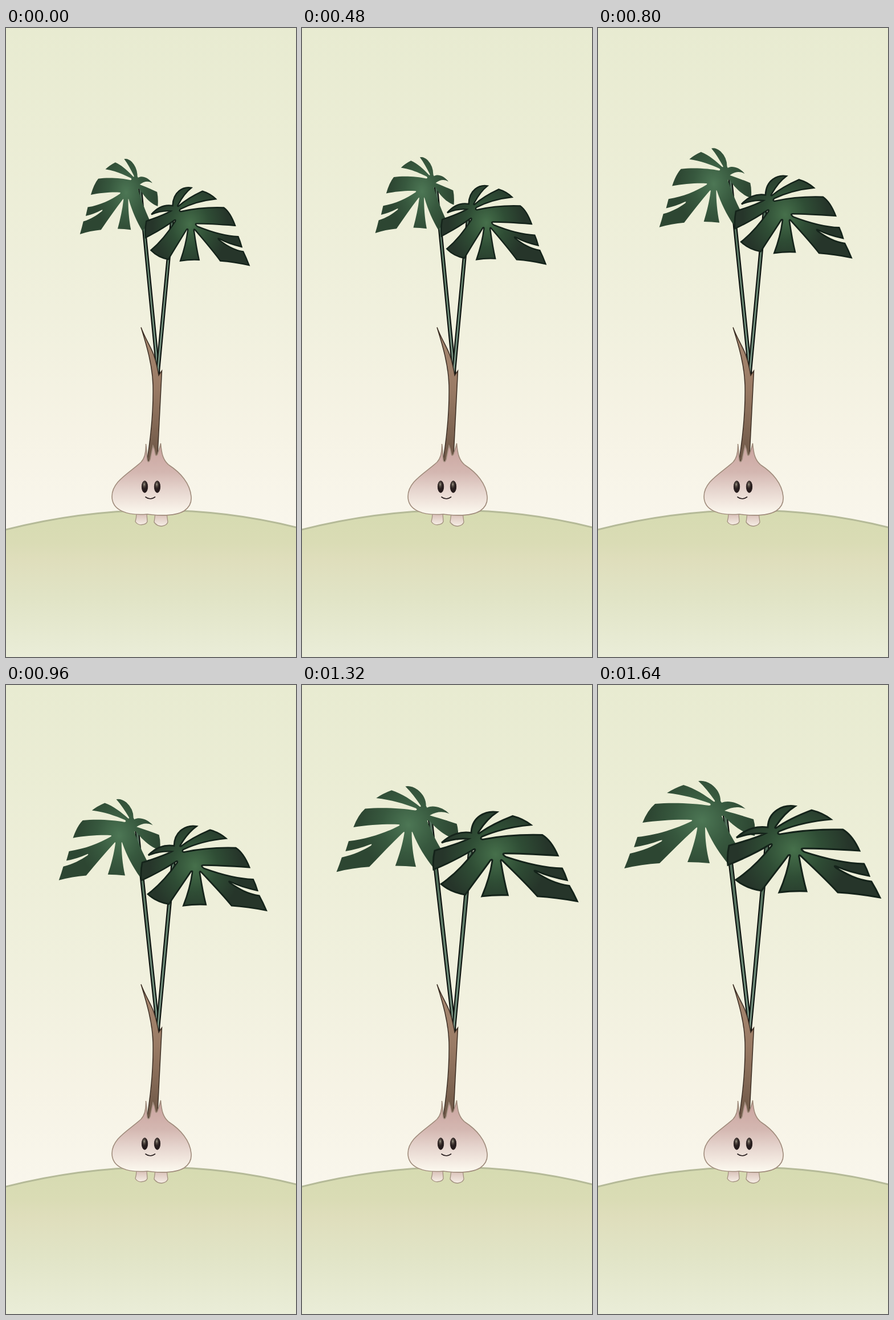
Write an HTML page that moves like this. It is 509 px wide and 1101 px high and loops after 2.04 s.

```html
<!DOCTYPE html>
<html lang="en">
<head>
<meta charset="utf-8">
<title>Growing plant</title>
<style>
html, body { margin: 0; width: 100%; height: 100%; overflow: hidden; background: #f0f0de; }
svg { display: block; width: 100%; height: 100%; }
</style>
</head>
<body>
<svg viewBox="0 0 509 1101">
  <defs>
    <linearGradient id="sky" gradientUnits="userSpaceOnUse" x1="0" y1="0" x2="0" y2="880">
      <stop offset="0" stop-color="#e8ebd1"/>
      <stop offset=".22" stop-color="#ebedd5"/>
      <stop offset=".56" stop-color="#f0f0dd"/>
      <stop offset=".8" stop-color="#f6f3e5"/>
      <stop offset="1" stop-color="#f9f6ec"/>
    </linearGradient>
    <linearGradient id="hill" gradientUnits="userSpaceOnUse" x1="0" y1="844" x2="0" y2="1101">
      <stop offset="0" stop-color="#d6dbb1"/>
      <stop offset=".22" stop-color="#dadcb5"/>
      <stop offset=".34" stop-color="#dfdebc"/>
      <stop offset=".6" stop-color="#e1e4c6"/>
      <stop offset="1" stop-color="#eaedd8"/>
    </linearGradient>
    <linearGradient id="stalk" gradientUnits="userSpaceOnUse" x1="0" y1="524" x2="0" y2="760">
      <stop offset="0" stop-color="#a88a72"/>
      <stop offset=".45" stop-color="#9a7b65"/>
      <stop offset="1" stop-color="#6b5545"/>
    </linearGradient>
    <linearGradient id="bulb" gradientUnits="userSpaceOnUse" x1="0" y1="727" x2="0" y2="853">
      <stop offset="0" stop-color="#c9a29d"/>
      <stop offset=".4" stop-color="#d4b7b1"/>
      <stop offset=".65" stop-color="#e6d5ce"/>
      <stop offset="1" stop-color="#fdfaf0"/>
    </linearGradient>
    <linearGradient id="foot" x1="0" y1="0" x2="0" y2="1">
      <stop offset="0" stop-color="#d6bcb4"/>
      <stop offset="1" stop-color="#f6eee5"/>
    </linearGradient>
    <radialGradient id="eye" cx=".42" cy=".3" r=".5">
      <stop offset="0" stop-color="#a5a392"/>
      <stop offset=".3" stop-color="#5a5048"/>
      <stop offset=".7" stop-color="#2d2322"/>
      <stop offset="1" stop-color="#261c1d"/>
    </radialGradient>
    <linearGradient id="stem" gradientUnits="userSpaceOnUse" x1="0" y1="330" x2="0" y2="600">
      <stop offset="0" stop-color="#536f5c"/>
      <stop offset=".5" stop-color="#678471"/>
      <stop offset="1" stop-color="#759080"/>
    </linearGradient>
    <radialGradient id="back" gradientUnits="userSpaceOnUse" cx="182" cy="237" r="92">
      <stop offset="0" stop-color="#4d7755"/>
      <stop offset=".55" stop-color="#37583e"/>
      <stop offset="1" stop-color="#2d4632"/>
    </radialGradient>
    <radialGradient id="front" gradientUnits="userSpaceOnUse" cx="343" cy="288" r="98">
      <stop offset="0" stop-color="#46704b"/>
      <stop offset=".5" stop-color="#2f4d35"/>
      <stop offset="1" stop-color="#26352a"/>
    </radialGradient>
  </defs>

  <rect width="509" height="1101" fill="url(#sky)"/>
  <path d="M-6 879.500Q262 811 515 875.500V1110H-6Z" fill="url(#hill)" stroke="#b5ba98" stroke-width="3"/>

  <g stroke="#070c09" stroke-width="2" fill="url(#stem)">
    <path id="stemL"/>
    <path id="stemR"/>
  </g>

  <path id="leafL" fill="url(#back)" d="M176 168Q187 166 199 174Q215 186 215 203L217 206C228 201 246 205 259 217C247 212 235 213 222 220C240 225 258 230 273 235Q277 248 275 264C256 260 236 246 221 229L217 229Q227 256 252 294L230 315C214 296 200 275 190 251Q188 247 188 251C188 268 190 290 196 312Q176 310 157 310C165 290 171 270 174 252Q175 247 171 251C150 270 130 290 108 312Q76 314 46 321Q52 307 56 295C79 290 95 283 111 274Q115 270 109 272Q88 280 63 284L69 266C105 262 138 251 163 239Q168 236 162 236C140 235 105 237 78 241Q87 219 100 208C130 205 170 207 195 211Q200 210 196 207C173 199 150 192 121 189Q133 181 150 175C170 181 188 193 203 204Q207 205 204 201C196 190 187 178 176 168Z"/>

  <path id="leafR" fill="url(#front)" stroke="#14231a" vector-effect="non-scaling-stroke" d="M346 212C325 209 299 220 298 249C276 246 257 254 243 267C261 261 279 259 293 260C272 270 250 275 230 281Q226 298 228 315C255 304 280 292 302 279Q306 277 305 281C286 305 266 325 242 341Q260 356 287 360C303 338 320 317 334 298Q338 296 337 300C334 320 328 340 318 363Q342 360 366 361C361 343 357 324 353 301Q352 296 356 299C378 320 400 340 421 363Q456 365 495 372Q488 357 480 344C455 341 436 331 418 320Q412 315 420 318C436 325 455 330 476 334Q472 322 467 313C431 312 396 303 362 292Q353 286 361 286C390 286 425 288 459 290Q447 263 430 253C395 252 352 255 319 261Q313 260 318 256C342 246 374 238 409 235Q395 224 375 219C351 228 330 238 313 250Q309 251 312 247C320 235 330 222 346 212Z"/>

  <path d="M237 524C247 556 257 590 258 625C259 670 255 710 248 755L252 760L266 748C268 700 271 650 273.500 600L268 608C266 597 263 583 260.500 576C256 560 245 546 237 524Z" fill="url(#stalk)" stroke="#3b2d23" stroke-width="1.500"/>

  <g stroke="#a2907f" stroke-width="1.300" fill="url(#foot)">
    <path d="M229 849Q229 857 227 864Q231 870 238 869.500Q246 869 248 864L247 849Z"/>
    <path d="M262 849Q261 858 260 865Q265 872 273 872Q282 871 284 865L282 849Z"/>
  </g>
  <path d="M245.500 728C246 743 244 753 237 760C215 780 186 794 186 820C186 844 212 854 248 851C280 855 300 853 313 845C323 838 326 830 325 820C323 797 306 778 286 765C276 757 273 746 271.500 727C270 736 267 741 266 746Q263 751 262 745Q261 737 258 731C256 740 254 749 253 755Q250 763 248 756C247 747 247 738 245.500 728Z" fill="url(#bulb)" stroke="#a08c7c" stroke-width="1.600"/>
  <g fill="url(#eye)" stroke="#251b1b" stroke-width=".8">
    <ellipse cx="243.500" cy="803" rx="5.200" ry="10.300"/>
    <ellipse cx="265.500" cy="803" rx="5.200" ry="10.300"/>
  </g>
  <path d="M245 821Q253 827 261.500 821" fill="none" stroke="#2a2020" stroke-width="1.700" stroke-linecap="round"/>
</svg>

<script>
const LOOP = 2040, STEP = 40, GROWN = 1640;
const get = id => document.getElementById(id);
const mix = (a, b, p) => a + (b - a) * p;
const wave = u => (1 - Math.cos(Math.PI * Math.max(0, u))) / 2;

// Paths show the grown leaf; scale and shift give the young one.
const plants = [
  { leaf: get('leafL'), stem: get('stemL'), sx: .5967, dx: 102.3, sy: .8606, dy: 84.7,
    top: [223, 227], base: [267, 604] },
  { leaf: get('leafR'), stem: get('stemR'), sx: .680, dx: 89.9, sy: .846, dy: 100.4,
    top: [297, 274], base: [266, 606] }
];

function spread(t) {
  const dip = .027;
  if (t < 300) return -dip * (1 - (1 - t / 300) ** 2);
  return (1 + dip + .003) * wave((t - 300) / 1400) - dip;
}

function stemPath([x, y], [bx, by], w) {
  return `M${x - w} ${y}L${bx - 2.6} ${by}H${bx + 2.6}L${x + w} ${y}Z`;
}

function draw(t) {
  const px = spread(t), py = wave((t - 280) / 1400);
  for (const { leaf, stem, sx, dx, sy, dy, top, base } of plants) {
    const a = mix(sx, 1, px), e = mix(dx, 0, px);
    const d = mix(sy, 1, py), f = mix(dy, 0, py);
    leaf.setAttribute('transform', `matrix(${a} 0 0 ${d} ${e} ${f})`);
    const end = [a * top[0] + e, d * top[1] + f];
    stem.setAttribute('d', stemPath(end, base, mix(2.4, 3.4, py)));
  }
  get('leafR').setAttribute('stroke-width', mix(2.4, 3, px));
}

const start = performance.now();
function tick() {
  const t = (performance.now() - start) % LOOP;
  draw(Math.min(GROWN, Math.floor(t / STEP) * STEP));
  requestAnimationFrame(tick);
}
tick();
</script>
</body>
</html>
```
